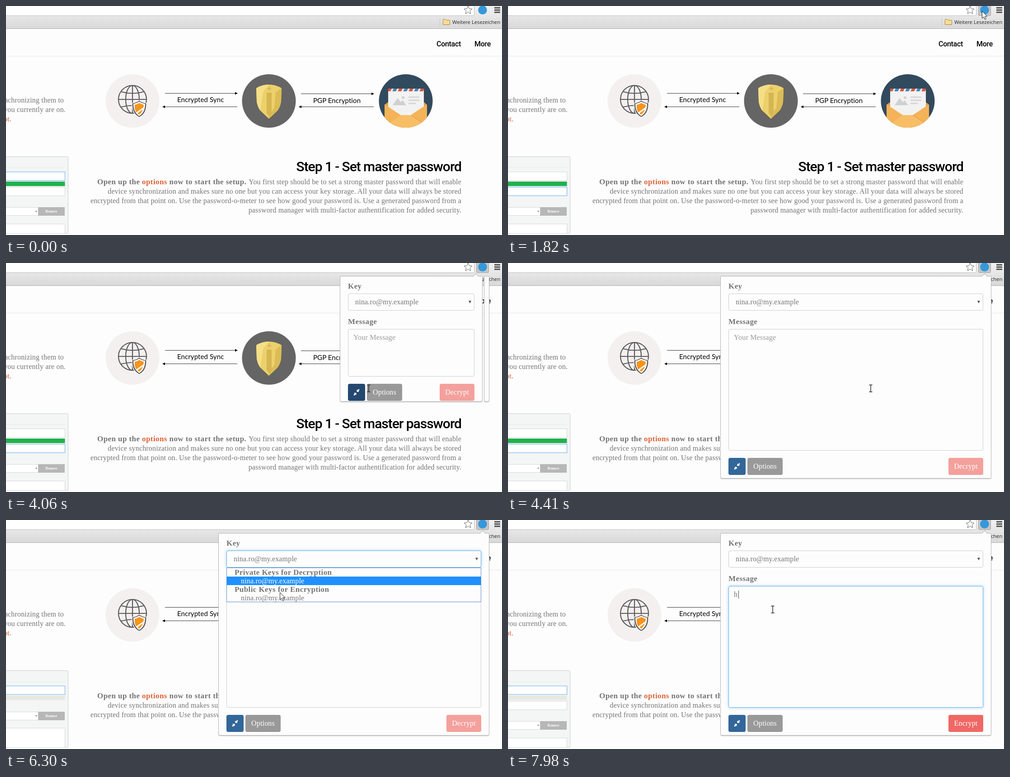
Write an HTML page that moves like this. It is 1098 px wide and 510 px high and loops after 8 s.

```html
<!DOCTYPE html>
<html lang="en">
<head>
<meta charset="utf-8">
<title>Encrypt from the browser popup</title>
<style>
html, body { margin: 0; width: 100%; height: 100%; overflow: hidden; background: #fdfdfd; }
body { position: relative; font: 16px "Liberation Serif", serif; letter-spacing: .17px; color: #747474; }
svg { position: absolute; left: 0; top: 0; }
b, .bold { font-weight: bold; font-size: 17px; letter-spacing: .42px; }
.sans { font-family: Roboto, sans-serif; font-weight: 500; letter-spacing: -.3px; fill: #000; }
.title { font-size: 30px; letter-spacing: -1.05px; }
.label { font: 15px Lato, sans-serif; letter-spacing: .1px; fill: #000; }
.end { text-anchor: end; }
.link { fill: #dc6236; }
.field { fill: #fff; stroke: #d5d8da; }
.field.on { stroke: #8cc6ee; stroke-width: 1.5; }

#popup, #strip { position: absolute; top: 30px; background: #fdfdfd; border-radius: 2px;
  box-shadow: 0 0 0 1px #b4b4b4, 0 2px 2px rgba(0,0,0,.25); }
#strip { left: 1059px; width: 10px; height: 278px; }
#popup > * { position: absolute; box-sizing: border-box; white-space: nowrap; }
#popup b { left: 17px; line-height: 20px; }
#tip { right: 9px; top: -5px; width: 10px; height: 10px; transform: rotate(45deg);
  background: #fdfdfd; border: solid #b4b4b4; border-width: 1px 0 0 1px; }
.input { left: 17px; right: 17px; border: 1px solid #ccc; border-radius: 4px; background: #fdfdfd; }
.input.on { border-color: #66afe9; box-shadow: 0 0 6px rgba(102,175,233,.6); }
#key { top: 38px; height: 38px; padding-left: 15px; line-height: 36px; }
#key i { position: absolute; right: 6px; top: 15px; border: solid transparent; border-width: 6px 3.5px 0;
  border-top-color: #555; }
#text { top: 117px; padding: 8px 11px; line-height: 20px; }
#caret { position: absolute; top: 9px; width: 1px; height: 18px; background: #444; }
.btn { height: 38px; border-radius: 4px; line-height: 38px; text-align: center; color: #fff; background: #999; }
#size { left: 17px; width: 38px; }
#opts { left: 59px; width: 78px; }
#go { right: 17px; width: 77px; }
#list { left: 17px; right: 17px; top: 76px; height: 77px; border: 1px solid #5a8ac6; background: #fdfdfd; line-height: 19px; }
#list div { height: 19px; padding-left: 31px; }
#list .bold { padding-left: 17px; }
#list .on { background: #1e90ff; color: #fff; }
</style>
</head>
<body>
<svg width="1098" height="510">
  <defs>
    <linearGradient id="bar" x2="0" y2="1"><stop stop-color="#f2f2f2"/><stop offset="1" stop-color="#d9d9d9"/></linearGradient>
    <clipPath id="disc"><circle cx="885" cy="211.5" r="59.5"/></clipPath>
    <pattern id="stripes" width="24" height="8" patternUnits="userSpaceOnUse" patternTransform="translate(846 184) skewX(-25)">
      <path d="M0 0h8v8H0z" fill="#d9593f"/><path d="M12 0h8v8h-8z" fill="#4a86b8"/>
    </pattern>
    <path id="head" d="M0 0l-6-3v6z"/>
  </defs>

  <!-- browser bars -->
  <path d="M0 0h1098v50H0z" fill="url(#bar)"/>
  <path d="M0 50.5h1098" stroke="#b3b3b3"/>
  <rect x="-9.5" y="-9.5" width="1046" height="31" rx="3" fill="#fff" stroke="#bcbcbc"/>
  <path d="M1023 0l2.6 6 6.4.6-4.8 4.3 1.4 6.3-5.6-3.3-5.6 3.3 1.4-6.3-4.8-4.3 6.4-.6z" fill="#fff" stroke="#666"/>
  <rect id="press" x="1041.5" y="-5.5" width="27" height="27" rx="2" fill="#c6c6c6" stroke="#a2a2a2"/>
  <circle cx="1055" cy="9" r="9.8" fill="#3498db"/>
  <path d="M1081 4h13M1081 9h13M1081 14h13" stroke="#4d4d4d" stroke-width="3"/>
  <rect id="hover" x="962.5" y="26.5" width="140" height="19" rx="2" fill="#eee" stroke="#bbb"/>
  <path d="M960.5 28v16" stroke="#c4c4c4"/>
  <path d="M967.5 41.5v-11q0-1 1-1h4l2 2h7q1 0 1 1v9z" fill="#fbdc92" stroke="#a5803a"/>
  <text x="988" y="39.5" style="font:11.2px 'Open Sans',sans-serif;letter-spacing:0" fill="#222">Weitere Lesezeichen</text>

  <!-- page head -->
  <g class="sans"><text x="953" y="90">Contact</text><text x="1037" y="90">More</text></g>
  <path d="M0 111.5h1098" stroke="#e6e6e6"/>
  <g fill="#747474" class="end">
    <text x="128" y="215">synchronizing them to</text>
    <text x="132" y="236">you currently are on.</text>
    <text x="12" y="257"><tspan class="link">ot</tspan>.</text>
  </g>

  <!-- globe -->
  <circle cx="280" cy="211.5" r="59.5" fill="#f4f0f0"/>
  <g fill="none" stroke="#58595b" stroke-width="2.2">
    <circle cx="280" cy="208" r="31"/><ellipse cx="280" cy="208" rx="15" ry="31"/>
    <path d="M280 177v62M249 208h62M255 191q25 7 50 0M255 225q25-7 50 0"/>
  </g>
  <path d="M295 210q8 6 16 6q1 24-16 32q-17-8-16-32q8 0 16-6z" fill="#58595b" stroke="#f4f0f0" stroke-width="1.5"/>
  <path d="M295 213q7 4 13 5q0 19-13 27q-13-8-13-27q6-1 13-5z" fill="#fff"/>
  <path d="M295 216q6 3 10 4q0 3-1 6l-16 11q-4-7-3-17q5-1 10-4z" fill="#f7941d"/>
  <path d="M303 230q-2 7-8 12l-4-3z" fill="#f7941d"/>

  <!-- gold shield -->
  <circle cx="582" cy="211.5" r="59.5" fill="#656565"/>
  <path d="M582 175q15 0 28 8l-1 30q-2 12-8 20l-19 18-19-18q-6-8-8-20l-1-30q13-8 28-8z" fill="#ecd06c"/>
  <path d="M554 183q13-8 28-8l-13 17-6 41q-6-8-8-20z" fill="#f5df86"/>
  <path d="M610 183l-1 30q-2 12-8 20l-19 18v-8l12-16 3-35z" fill="#dcbc55"/>
  <path d="M577 193h11v45l-6 7-5-6z" fill="#d6b650"/>
  <path d="M583 178l1.5 4.5L589 184l-4.5 1.5L583 190l-1.5-4.5L577 184l4.5-1.5z" fill="#d8b852"/>

  <!-- letter -->
  <g clip-path="url(#disc)">
    <path d="M825 150h120v125H825z" fill="#324a5e"/>
    <path d="M838 220l8-6h79l7 6v54h-94z" fill="#e3a04c"/>
    <path d="M846 184h79v70h-79z" fill="#f2f2f2"/>
    <path d="M846 184h79v6h-79z" fill="url(#stripes)"/>
    <path d="M856 221l11-16 7 9 4-4 8 11z" fill="#d0d0d0"/><circle cx="879" cy="204" r="3" fill="#d0d0d0"/>
    <path d="M891 203h24M891 210h24M891 217h16" stroke="#d5d5d5" stroke-width="3"/>
    <path d="M838 219l36 24h22l36-24v55h-94z" fill="#f4b358"/>
    <path d="M838 269l36-26h22l36 26v5h-94z" fill="#f8be66"/>
    <path d="M896 243l36 24" stroke="#dd9b45"/>
  </g>

  <path d="M352 194.5h156M351 224.5h161M653 195.5h156M652 224.5h162" stroke="#333"/>
  <use href="#head" x="513" y="194.5"/><use href="#head" x="815" y="195.5"/>
  <use href="#head" transform="translate(346 224.5) scale(-1 1)"/>
  <use href="#head" transform="translate(648 224.5) scale(-1 1)"/>
  <g class="label"><text x="379" y="214">Encrypted Sync</text><text x="680" y="216">PGP Encryption</text></g>

  <!-- step one -->
  <text class="sans title end" x="1008" y="368">Step 1 - Set master password</text>
  <g fill="#747474">
    <text class="bold" x="202" y="397">Open up the <tspan class="link">options</tspan> now to start the setup.</text>
    <g class="end">
      <text x="1008" y="397">You first step should be to set a strong master password that will enable</text>
      <text x="1008" y="418">device synchronization and makes sure no one but you can access your key storage. All your data will always be stored</text>
      <text x="1008" y="439">encrypted from that point on. Use the password-o-meter to see how good your password is. Use a generated password from a</text>
      <text x="1008" y="460">password manager with multi-factor authentification for added security.</text>
    </g>
  </g>

  <!-- setup form -->
  <rect x="-9.5" y="335.5" width="147" height="171" rx="2" fill="#f4f5f5" stroke="#c9cbcc"/>
  <path d="M0 359.5h131" stroke="#e8eaea"/>
  <rect id="first" class="field" x="-9.5" y="369.5" width="140" height="19"/>
  <rect id="meter" y="391" width="130.5" height="10"/>
  <rect id="second" class="field" x="-9.5" y="403.5" width="140" height="19"/>
  <g id="pick">
    <rect class="field" x="-9.5" y="448.5" width="81" height="18"/>
    <path d="M65 456h4l-2 3z" fill="#777"/>
    <path d="M71 448h59v19H71z" fill="#b7b7b7"/>
    <text x="100.5" y="460" text-anchor="middle" fill="#fff" style="font-size:7.5px;font-weight:bold;letter-spacing:0">Remove</text>
  </g>
  <rect id="last" class="field" x="-9.5" width="140"/>
</svg>

<div id="strip"></div>
<div id="popup">
  <div id="tip"></div>
  <b style="top:12px">Key</b>
  <div id="key" class="input">nina.ro@my.example<i></i></div>
  <b style="top:91px">Message</b>
  <div id="text" class="input"><span id="typed"></span><span id="caret"></span></div>
  <div id="size" class="btn"><svg width="38" height="38" fill="#fff"><path id="arrows"/></svg></div>
  <div id="opts" class="btn">Options</div>
  <div id="go" class="btn"></div>
  <div id="list">
    <div class="bold">Private Keys for Decryption</div><div id="privateKey">nina.ro@my.example</div>
    <div class="bold">Public Keys for Encryption</div><div id="publicKey">nina.ro@my.example</div>
  </div>
</div>

<svg width="1098" height="510">
  <g id="mouse">
    <path id="arrow" d="M.5.5v16l3.7-3.5 2.6 6 2.6-1.1-2.6-5.9h5z" fill="#fff" stroke="#222"/>
    <path id="beam" d="M-3.5-7.5h2.500l1 1 1-1h2.500M-3.5 8h2.500l1-1 1 1h2.500M0-7v14" fill="none" stroke="#222" stroke-width="1.4"/>
  </g>
</svg>

<script>
const LOOP = 8000, STEP = 70;
const $ = id => document.getElementById(id);
const show = (id, on) => $(id).style.visibility = on ? '' : 'hidden';
const mark = (id, on) => $(id).classList.toggle('on', on);
const within = (t, a, b) => t >= a && t < b;

// time, x, y
const path = [
  [280, 0, 428], [560, 385, 260], [840, 745, 100], [910, 805, 75], [1050, 1050, 30], [1260, 1056, 22],
  [1540, 1049, 11], [2380, 1049, 11], [3150, 871, 141], [3220, 853, 164], [3570, 803, 279], [4410, 803, 279],
  [4900, 672, 125], [5180, 650, 78], [5600, 650, 78], [6160, 622, 150], [6300, 606, 161], [6440, 596, 169],
  [6580, 594, 170], [6650, 594, 170], [7000, 586, 199], [LOOP, 586, 199]
];
// time, left, right, message bottom, popup bottom
const frame = [
  [0, 768, 1069, 245, 316], [3990, 768, 1069, 245, 316], [4060, 740, 1054, 253, 308],
  [4130, 650, 1069, 308, 366], [4270, 471, 1069, 418, 479], [LOOP, 471, 1069, 418, 479]
];
const EXPAND = 'M13 13h5l-1.6 1.6 2.6 2.6 2.6-2.6L20 13h5v5l-1.6-1.6-2.6 2.6 2.6 2.6L25 20v5h-5l1.6-1.6-2.6-2.6-2.6 2.6L18 25h-5v-5l1.6 1.6 2.6-2.6-2.6-2.6L13 18z';
const SHRINK = 'M13 20h5.5v5.5l-1.7-1.7-2.6 2.6-2-2 2.600-2.600zM25 18h-5.5v-5.5l1.7 1.7 2.6-2.6 2 2-2.6 2.6z';

function at(keys, t) {
  const i = Math.max(1, keys.findIndex(k => k[0] >= t));
  const a = keys[i - 1], b = keys[i];
  const f = Math.max(0, (t - a[0]) / (b[0] - a[0]));
  return a.slice(1).map((v, n) => v + (b[n + 1] - v) * f);
}

function drawForm(t) {
  const short = within(t, 5180, 6860), shift = short ? -21 : 0;
  mark('first', t < 700 || t >= 5880);
  mark('second', within(t, 700, 5180));
  show('second', !short);
  $('meter').setAttribute('fill', t < 5180 ? '#22b14c' : '#e9e9e1');
  $('pick').setAttribute('transform', `translate(0 ${shift})`);
  $('last').setAttribute('y', short ? 463.5 : 485.5);
  $('last').setAttribute('height', short ? 43 : 21);
}

function drawPopup(t) {
  const [left, right, textEnd, end] = at(frame, t);
  const style = $('popup').style;
  style.left = left + 'px';
  style.width = right - left + 'px';
  style.height = end - 30 + 'px';
  style.opacity = Math.min(1, Math.max(0, (t - 1820) / 210));
  show('strip', t === 4060);
  $('text').style.height = textEnd - 147 + 'px';
  for (const id of ['size', 'opts', 'go']) $(id).style.top = textEnd - 14 + 'px';

  $('size').style.background = within(t, 3500, 4130) ? '#24486f' : '#336699';
  $('arrows').setAttribute('d', t < 4060 ? EXPAND : SHRINK);
  $('go').textContent = t < 6720 ? 'Decrypt' : 'Encrypt';
  $('go').style.background = t < 7910 ? '#f4a09c' : t < 7980 ? '#f28582' : '#f06865';

  mark('key', within(t, 5180, 7140));
  mark('text', t >= 7140);
  show('list', within(t, 5320, 6720));
  mark('privateKey', t < 6440);
  mark('publicKey', t >= 6440);

  const typing = t >= 7910;
  $('typed').textContent = typing ? 'h' : 'Your Message';
  $('typed').style.color = typing ? '#747474' : '#999';
  $('caret').style.left = typing ? '20.5px' : '11px';
  show('caret', within(t, 7140, 7630) || typing);
}

function drawMouse(t) {
  const [x, y] = at(path, t);
  const beam = within(t, 3220, 3430) || within(t, 4060, 4830) || t >= 6720;
  $('mouse').setAttribute('transform', `translate(${Math.round(x)} ${Math.round(y)})`);
  show('mouse', t >= 280);
  $('arrow').style.display = beam ? 'none' : '';
  $('beam').style.display = beam ? '' : 'none';
  show('hover', within(t, 1050, 1330));
  show('press', t >= 1680);
}

function draw(now) {
  const t = Math.floor(now % LOOP / STEP) * STEP;
  drawForm(t);
  drawPopup(t);
  drawMouse(t);
}

const start = performance.now();
function tick() {
  draw(performance.now() - start);
  requestAnimationFrame(tick);
}
tick();
</script>
</body>
</html>
```
